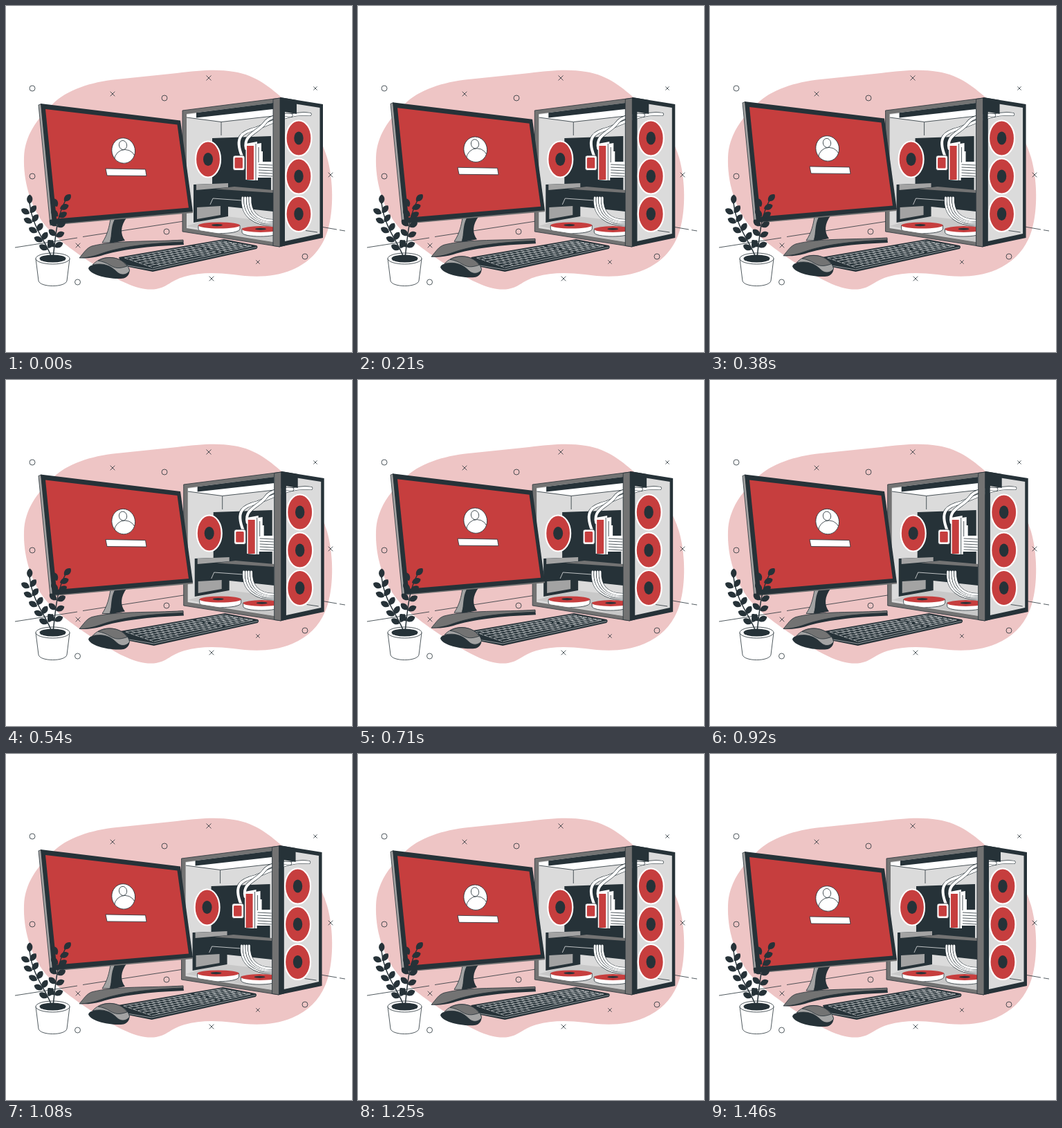
Animation, 500 px wide and 500 px high, one loop 1.5 s. Source, as an HTML page:

```html
<!DOCTYPE html>
<html>
<head>
<meta charset="utf-8">
<title>Desktop computer</title>
<style>
html, body { margin: 0; width: 100%; height: 100%; overflow: hidden; background: #fff }
svg { display: block; width: 100%; height: 100%; --ink: #263238 }
.ink { fill: #263238 } .red { fill: #c63e3e } .gray { fill: #737373 }
.pale { fill: #dbdbdb } .mid { fill: #a3a3a3 } .white { fill: #fff }
.line { fill: none; stroke: #263238; stroke-width: .8 }
.edge { stroke: #263238; stroke-width: .8; stroke-linejoin: round }
.ring { stroke: #fff; stroke-width: 2.2 }
</style>
</head>
<body>
<svg viewBox="0 0 500 500">
  <defs>
    <clipPath id="window"><path d="M261 156 386 140V341L261 321Z"/></clipPath>
    <clipPath id="avatar"><ellipse cx="169.700" cy="209" rx="16.800" ry="18.300" transform="rotate(-12 169.700 209)"/></clipPath>
  </defs>
  <path fill="#eec5c5" d="M67 142C88 121 122 110 160 106L247 97C280 93 304 91 329 95C362 100 382 118 404 137C437 164 455 188 464 219C473 250 474 294 465 324C457 350 441 369 414 381C386 393 356 392 328 388C302 385 279 385 258 391C237 397 234 406 217 409C194 413 163 397 140 382C108 361 75 340 55 315C34 287 25 251 26 219C27 187 45 163 67 142Z"/>
  <path id="marks" class="line"/>
  <path class="line" d="M13 349 103 335M111 333.500 260 310.500M455 319 478 323M482 323.700 490 325"/>

  <g class="shake">
    <path class="gray edge" d="M255 151 396 133V348L255 326Z"/>
    <path class="pale" d="M261 156 386 140V341L261 321Z"/>
    <g clip-path="url(#window)">
      <path class="white" d="M261 157 386 141V159L311 167 261 161Z"/>
      <path class="ink" d="M275 154 386 139V149L275 161.500Z"/>
      <path class="line" d="M261 161 311 167.500 386 159M311 168V187"/>
      <path class="mid" d="M261 318 310 303 386 312V341Z" opacity=".35"/>
      <path class="ink" d="M298 191 383 188V268L298 264Z"/>
      <path class="white edge" d="M278 317V322C278 331 338 331 338 322V317ZM341 322V327C341 335 394 335 394 327V322Z"/>
      <ellipse class="red" cx="308" cy="317" rx="30" ry="4.600"/>
      <ellipse class="red" cx="368" cy="322.500" rx="27" ry="4.400"/>
      <ellipse class="ink" cx="305" cy="316.600" rx="8" ry="1.600"/>
      <ellipse class="ink" cx="368" cy="322.300" rx="8" ry="1.500"/>
      <path class="ink" d="M271 258 321 256V264L386 268V297L340 292 321 290V304L271 313Z"/>
      <path class="mid" d="M275 258 321 256V262L275 266ZM276 291 310 289V302L276 308Z"/>
      <path class="gray" d="M303 264.500 330 261 386 266V270Z"/>
      <path fill="none" stroke="#fff" stroke-width=".7" d="M295 287 299 278 341 281"/>
    </g>
    <ellipse class="red ring" cx="292" cy="221.500" rx="18" ry="26"/>
    <ellipse class="ink" cx="292" cy="221.500" rx="7" ry="9.500"/>
    <path class="ink" d="M396 132 458 142V335L396 348Z"/>
    <path class="pale" d="M403 139 453.500 147V329L403 340Z"/>
    <path class="line" d="M433 324.500 450 327"/>
    <g id="tubes" fill="none"></g>
    <rect class="white edge" x="328" y="216" width="17" height="21.500" rx="3"/>
    <rect class="red" x="330.500" y="219" width="11.500" height="15.500" rx="1.500"/>
    <path class="white" d="M346.500 199 363 196V199L369 198V210H371V225H385V248H364V252H358L346.500 251Z"/>
    <path class="red" d="M348 202H358V251H348Z"/>
    <path class="line" d="M361 199V252M365 204V226M365 229 385 230M365 233 385 234M365 237 385 238M365 241 385 242M365 245 385 246"/>
    <path class="gray edge" stroke-width=".4" d="M386 134.500 396 133V348L386 346.500Z"/>
    <path class="ink" d="M396 132 403 133V346.500L396 348ZM403 133 420 136V156L403 153Z"/>
    <g id="fans"></g>
  </g>

  <g class="float">
    <path class="mid edge" d="M151 308 160 307 150 342H139C147 330 149 319 151 308Z"/>
    <path class="ink" d="M157 308 175 305C165 318 165 330 172 339L150 343C153 331 151 320 157 308Z"/>
    <path class="ink" d="M106 364C150 357 156 342 256 338L257 345C205 347 165 352 137 361C126 364 115 365 106 364Z"/>
    <path class="gray edge" d="M106 364C113 356 116 350 124 347C158 338 210 341 256 338V341C204 343 165 348 137 358C126 362 116 364 106 364Z"/>
    <path class="mid edge" d="M47 143 51 141.500 69 315 64 317Z"/>
    <path class="gray" d="M64 317 67 314 270 296V299Z"/>
    <path class="ink" d="M50 141 252 165.500 270 297 67 315.500Z"/>
    <path class="red" d="M57 149 247.500 171.500 264 291.500 73 307.500Z"/>
    <g clip-path="url(#avatar)">
      <path class="white" d="M150 188H190V230H150Z"/>
      <ellipse class="white edge" cx="172" cy="223" rx="15.500" ry="15.500"/>
      <ellipse class="white edge" cx="169" cy="201" rx="5.600" ry="6.600" transform="rotate(-12 169 201)"/>
    </g>
    <ellipse class="line" cx="169.700" cy="209" rx="16.800" ry="18.300" transform="rotate(-12 169.700 209)"/>
    <path class="white edge" d="M144 235 201.500 236 203 245.500 146 245Z"/>
  </g>

  <g class="shake">
    <path class="ink" d="M163 363 315 337 362 346Q365 348 362 351L212 384 167 375Z"/>
    <path id="keys" fill="none" stroke="#fff" stroke-width=".55"/>
    <path fill="none" stroke="#fff" stroke-width=".5" d="M170 374 212 381 362 348.500"/>
  </g>

  <g class="float">
    <path class="ink" d="M119 379C121 373 132 373 140 372L178 379C180 386 176 392 170 393.500C152 396 121 389 119 379Z"/>
    <path class="mid edge" d="M125 374C136 362 153 361 165 367C174 371 178 378 178.500 383C174 389 166 390 160 384C151 375 141 371 125 374Z"/>
    <path class="gray edge" d="M133 368C143 362 157 362 167 368C171 371 174 374 175 376C163 380 158 379 151 375C145 371 139 369 133 368Z"/>
  </g>

  <path class="white edge" d="M43 365 47 397C49 407 86 407 88 397L92 365Z"/>
  <ellipse class="white edge" cx="67.500" cy="365" rx="24.500" ry="8"/>
  <ellipse class="ink" cx="67.500" cy="365" rx="19" ry="5.600"/>
  <path class="line" style="stroke-width:1.500" d="M66 364C60 343 38 322 34 284M68 364C72 330 73 304 87 279"/>
  <g id="leaves" class="ink"></g>
</svg>
<script>
const $ = id => document.getElementById(id);

const cross = (x, y, r) => `M${x - r} ${y - r}l${2 * r} ${2 * r}m0 ${-2 * r}l${-2 * r} ${2 * r}`;
const circle = (x, y, r) => `M${x - r} ${y}a${r} ${r} 0 1 0 ${2 * r} 0a${r} ${r} 0 1 0 ${-2 * r} 0`;
$('marks').setAttribute('d',
  [[293, 104, 3.5], [154, 127, 3.3], [447, 119, 2.6], [469, 244, 3.3], [104, 346, 3.3], [364, 370, 2.7], [297, 394, 3.3]]
    .map(m => cross(...m)).join('') +
  [[38, 119], [229, 133], [38, 246], [232, 326], [432, 362], [103.5, 399]]
    .map(m => circle(...m, 4)).join(''));

$('fans').innerHTML = [191, 246, 300.5].map(y =>
  `<ellipse class="red ring" cx="423" cy="${y}" rx="18.500" ry="25.500"/>
   <ellipse class="ink" cx="423" cy="${y}" rx="6.700" ry="9.500"/>`).join('');

const tube = (d, width) =>
  `<path d="${d}" stroke="var(--ink)" stroke-width="${width + 1.2}" stroke-linecap="round"/>
   <path d="${d}" stroke="#fff" stroke-width="${width}" stroke-linecap="round"/>`;
$('tubes').innerHTML =
  tube('M341 217C330 190 340 182 362 177C390 166 412 153 439 156.500', 4) +
  tube('M347 206C342 186 364 183 374 169C380 160 400 156 412 158', 4) +
  [0, 1, 2, 3].map(i =>
    tube(`M${342 + i * 3.6} 277C${340 + i * 4} ${304 - i * 3} 360 ${316 - i * 2} 386 ${316 - i * 2}`, 3)).join('');

// Keyboard rows and staggered keys on a skewed quad
const corners = [[171, 364], [313, 339.5], [355, 347], [212, 378]];
const onBoard = (u, v) => [0, 1].map(k => (
  (corners[0][k] * (1 - u) + corners[1][k] * u) * (1 - v) +
  (corners[3][k] * (1 - u) + corners[2][k] * u) * v).toFixed(1)).join(' ');
const segment = (u1, v1, u2, v2) => `M${onBoard(u1, v1)}L${onBoard(u2, v2)}`;
let keys = '';
for (let row = 0; row <= 6; row++) {
  const v = row / 6;
  keys += segment(0, v, .69, v) + segment(.72, v, 1, v);
  if (row === 6) continue;
  for (let col = 0; col <= 18; col++) {
    const u = Math.min(1, (col + (col && col < 18 ? row % 3 * .3 : 0)) / 18);
    if (row === 5 && col > 4 && col < 9) continue;
    keys += segment(u, v + .02, u, v + .145);
  }
}
$('keys').setAttribute('d', keys);

const leaf = ([x, y, angle]) =>
  `<path transform="translate(${x} ${y})rotate(${angle})" d="M0 0C-6-4-5-11 0-13.500C5-11 6-4 0 0"/>`;
$('leaves').innerHTML = [
  [34, 286, 2], [34, 300, -62], [35, 299, 38], [38, 313, -65], [38, 312, 38], [45, 327, -62], [45, 325, 35],
  [53, 340, -65], [52, 338, 35], [60, 352, -62], [61, 350, 30],
  [84, 282, 45], [74, 290, -28], [78, 293, 68], [75, 304, -45], [76, 305, 62], [73, 318, -48], [74, 319, 62],
  [72, 332, -48], [72, 333, 65], [70, 348, -45], [70, 348, 65]
].map(leaf).join('');

const LOOP = 1500, POSES = 36;
const shakeSteps = [0, -1, 2, -4, 4, -4, 4, -4, 2, -1, 0];
const shakeAt = p => {
  const i = Math.min(9, Math.floor(p * 10));
  return shakeSteps[i] + (shakeSteps[i + 1] - shakeSteps[i]) * (p * 10 - i);
};
const floatAt = p => -6 * (1 - Math.abs(2 * p - 1));
const move = (name, x, y) => document.querySelectorAll(name)
  .forEach(g => g.setAttribute('transform', `translate(${x} ${y})`));

function draw() {
  const time = performance.now() % LOOP;
  const pose = Math.min(POSES - 1, Math.floor((time + 5) / LOOP * POSES));
  const p = pose / (POSES - 1);
  move('.shake', shakeAt(p), 0);
  move('.float', 0, floatAt(p));
  requestAnimationFrame(draw);
}
draw();
</script>
</body>
</html>
```
